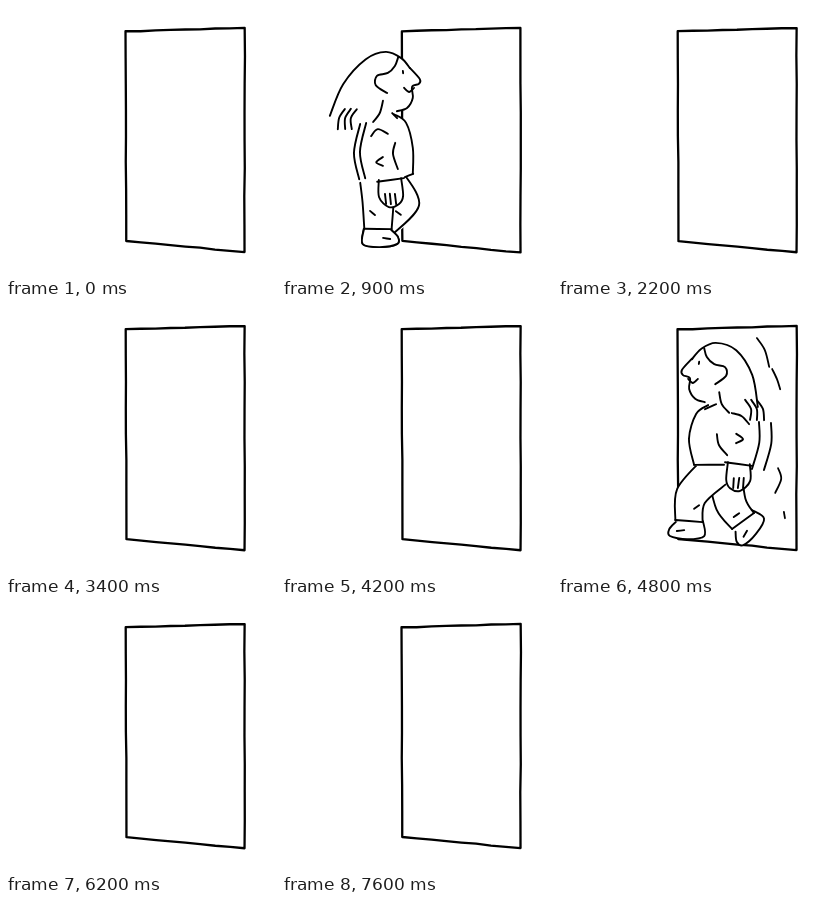
Write an HTML page with a canvas that moves like this. It is 270x270 px and loops after 7700 ms.

```html
<!DOCTYPE html>
<html lang="en">
<head>
<meta charset="utf-8">
<title>Doorway</title>
<style>
html, body { margin: 0; width: 100%; height: 100%; overflow: hidden; background: #fff; }
canvas { display: block; width: 100vmin; height: 100vmin; }
</style>
</head>
<body>
<canvas id="stage"></canvas>
<script>
const SIZE = 270, STEP = 100, STEPS = 77;
const MIRROR = 262;          // flips the walker to face left
const STRIDE = Math.PI / 3;  // gait angle per step
const canvas = document.getElementById('stage');
const ctx = canvas.getContext('2d');
let rnd;

function random(seed) {
  return () => {
    seed = (seed * 16807 + 11) % 2147483647;
    return seed / 2147483647;
  };
}

const wob = () => (rnd() - 0.5) * 0.5;

// Flat coordinates to slightly shaky points
function pts(...n) {
  const out = [];
  for (let i = 0; i < n.length; i += 2) out.push([n[i] + wob(), n[i + 1] + wob()]);
  return out;
}

// Smooth curve through all points
function trace(p) {
  ctx.beginPath();
  ctx.moveTo(...p[0]);
  for (let i = 0; i < p.length - 1; i++) {
    const a = p[i - 1] || p[i], b = p[i], c = p[i + 1], d = p[i + 2] || c;
    ctx.bezierCurveTo(
      b[0] + (c[0] - a[0]) / 6, b[1] + (c[1] - a[1]) / 6,
      c[0] - (d[0] - b[0]) / 6, c[1] - (d[1] - b[1]) / 6, c[0], c[1]);
  }
}
const stroke = p => { trace(p); ctx.stroke(); };
const fill = p => { trace(p); ctx.fill(); };
const line = (...n) => stroke(pts(...n));

function drawDoor() {
  const corners = pts(119.8, 25.2, 238.6, 21.8, 238.6, 246.4, 120.3, 235);
  ctx.lineWidth = 2.3;
  ctx.beginPath();
  corners.forEach(([x, y], i) => {
    const [x2, y2] = corners[(i + 1) % 4];
    for (let k = 0; k < 1; k += 0.125) ctx.lineTo(x + (x2 - x) * k + wob(), y + (y2 - y) * k + wob());
  });
  ctx.closePath();
  ctx.stroke();
}

// Joints follow the gait angle: 0 is the front of a stride, PI the back
function drawLeg(angle) {
  const c = Math.cos(angle), sn = Math.sin(angle), mid = Math.abs(sn);
  const joints = [
    [101 + 6 * c + 6 * sn, 169 + 7 * mid],
    [109 + 20 * c + 13 * sn, 196 - 4 * c],
    [104 + 27 * c - 8 * mid, 217 + 6 * mid]
  ];
  const widths = [17, 15.5, 13.5];
  const side = dir => joints.map(([x, y], i) => {
    const a = joints[Math.max(i - 1, 0)], b = joints[Math.min(i + 1, 2)];
    const len = Math.hypot(b[0] - a[0], b[1] - a[1]);
    const w = dir * widths[i] / len;
    return [x + (b[1] - a[1]) * w + wob(), y - (b[0] - a[0]) * w + wob()];
  });
  const front = side(1), back = side(-1);
  fill([...front, ...back.slice().reverse()]);

  ctx.save();
  ctx.translate(...joints[2]);
  ctx.rotate(0.9 * Math.max(0, -c));
  const foot = pts(13, 1, 20, 8, 19, 15, 2, 18, -15, 15, -14, 0);
  fill(foot);
  stroke(foot);
  line(5, 9, 12, 10);
  ctx.restore();

  stroke(front);
  stroke(back);
  stroke([back[2], front[2]]);
  const [kx, ky] = joints[1];
  line(kx - 8, ky + 9, kx - 3, ky + 13);
}

// s grows from 0 with feet together to 1 at full stride
function drawTorso(s) {
  const chest = pts(112, 108, 124, 117, 131, 142, 131 - 5 * s, 168);
  const back = pts(84 - 23 * s, 117 + 8 * s, 78 - 17 * s, 146, 83 - 15 * s, 172);
  fill([...chest, ...back.slice().reverse()]);
  stroke(chest);
  stroke(back);
  stroke(back.map(([x, y]) => [x - 6 - 6 * s, y + 1]));
  line(110 - 6 * s, 107, 115, 112);
  line(123 - 27 * s, 171 - 3 * s, 131 - 5 * s, 168);
}

function drawArm(s) {
  line(89 - 18 * s, 130 - 3 * s, 96 - 18 * s, 123 - 4 * s, 106 - 18 * s, 128 - 12 * s);
  line(101 - 17 * s, 151 - 14 * s, 94 - 17 * s, 156 - 14 * s, 101 - 17 * s, 160 - 14 * s);
  line(113 - 10 * s, 137, 111 - 10 * s, 148, 116 - 23 * s, 163 - 5 * s);
  ctx.save();
  ctx.translate(109 - 27 * s, 187 - 7 * s);
  const hand = pts(-12, -13, -12, 4, -2, 14, 8, 11, 12, 3, 10, -15);
  fill(hand);
  stroke(hand);
  line(-14, -11, 13, -15);
  for (let x = -6; x < 8; x += 5) line(x, 1, x + 1, 11);
  ctx.restore();
}

function drawHead(s) {
  const hair = pts(48 + 14 * s, 110, 61 + 7 * s, 78, 84, 53, 104, 46, 119, 52, 128, 62);
  const face = pts(128, 62, 138, 73, 137, 78, 130, 81, 131, 92, 125, 102, 115, 105);
  fill([...hair, ...face]);
  stroke(hair);
  stroke(face);
  line(122, 82, 127, 86, 132, 82);
  line(121, 65, 121, 67);
  line(116, 51, 113, 60, 106, 67, 95, 70, 94, 79, 105, 87);
  line(101, 95, 98, 107, 91, 116);
  for (let i = 0; i < 3; i++) line(63 + i * 6, 103, 57 + i * 6, 112, 56 + i * 7, 123);
}

function drawWalker(dx, angle, left) {
  const s = Math.abs(Math.cos(angle));
  ctx.save();
  ctx.beginPath();
  ctx.rect(0, 0, 237.5, SIZE);
  ctx.clip();
  ctx.translate(left ? MIRROR - dx : dx, 0);
  if (left) ctx.scale(-1, 1);
  ctx.lineWidth = 1.9;
  drawLeg(angle + Math.PI);
  drawLeg(angle);
  ctx.translate(0, -7 * s);
  drawTorso(s);
  drawArm(s);
  drawHead(s);
  ctx.restore();
}

function drawRipples(shift) {
  ctx.save();
  ctx.translate(shift, 0);
  ctx.lineWidth = 1.8;
  line(199, 34, 207, 46, 211, 63);
  line(214, 65, 219, 75, 222, 85);
  line(220, 164, 223, 175, 217, 189);
  line(226, 208, 227, 214);
  ctx.restore();
}

function render(time) {
  const step = Math.floor(time / STEP) % STEPS;
  const scale = canvas.width / SIZE;
  rnd = random(step % 4 * 9973 + 31337);
  ctx.setTransform(scale, 0, 0, scale, 0, 0);
  ctx.fillStyle = '#fff';
  ctx.strokeStyle = '#000';
  ctx.lineCap = ctx.lineJoin = 'round';
  ctx.fillRect(0, 0, SIZE, SIZE);
  drawDoor();
  const going = step - 9, coming = step - 48;
  if (step >= 1 && step <= 16) drawWalker(going * 24, -Math.PI / 2 - going * STRIDE, false);
  if (Math.abs(coming) <= 2) drawRipples(coming * 3);
  if (step >= 42 && step <= 57) drawWalker(coming * 23, -coming * STRIDE, true);
}

function resize() {
  const side = Math.min(innerWidth, innerHeight) || SIZE;
  canvas.width = canvas.height = Math.round(side * (devicePixelRatio || 1));
}

addEventListener('resize', resize);
resize();
const start = performance.now();
function tick() {
  render(performance.now() - start);
  requestAnimationFrame(tick);
}
tick();
</script>
</body>
</html>
```
